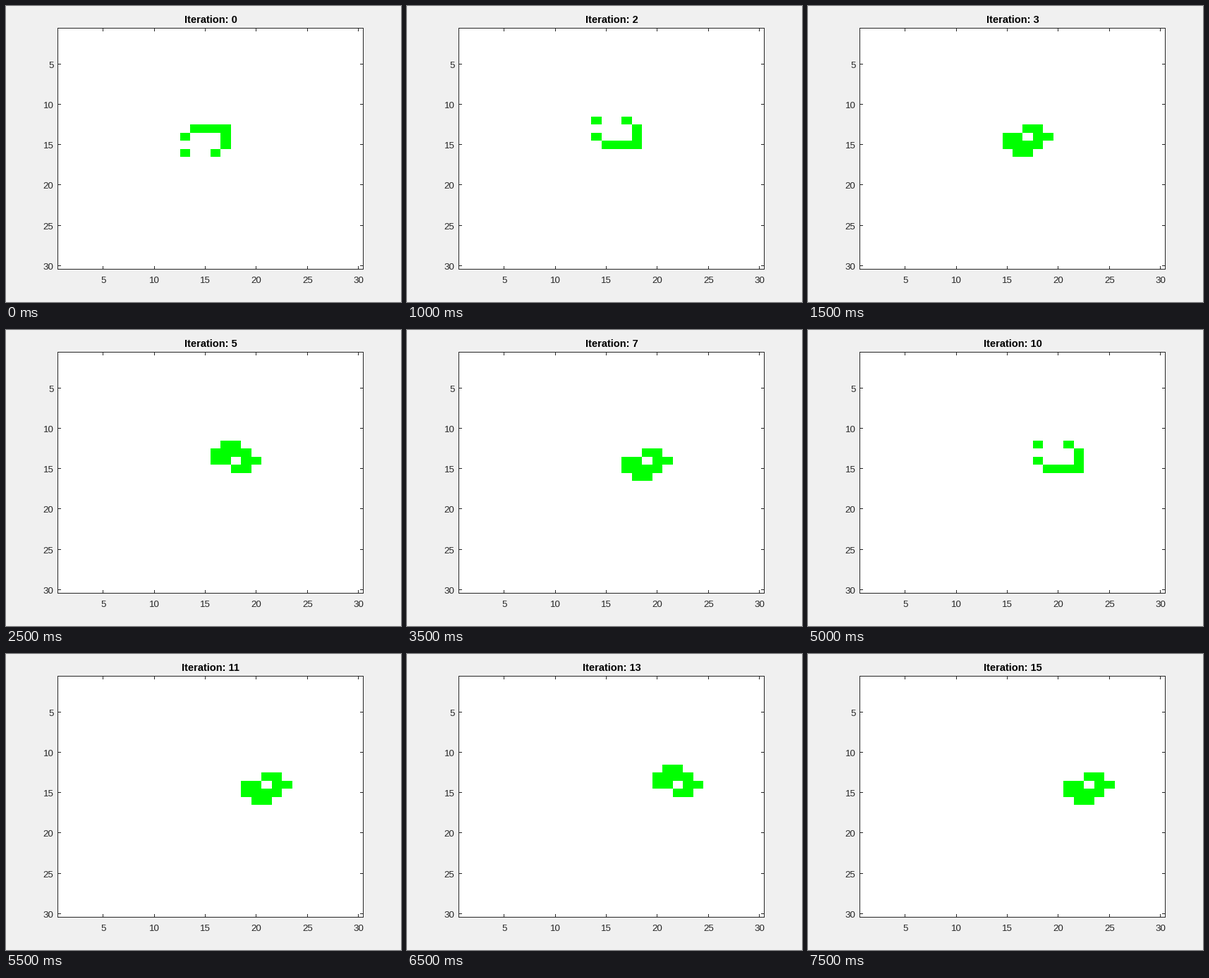
A matplotlib script that plays this animation: 560x420 px, repeating every 8000 ms.

```python
import numpy as np
import matplotlib.pyplot as plt
from matplotlib.animation import FuncAnimation
from matplotlib.colors import ListedColormap
from matplotlib.patches import Rectangle

W, H, DPI = 560, 420, 100
N, STEPS, STEP_MS = 30, 16, 500
LEFT, TOP, RIGHT, BOTTOM = 73, 31, 507, 374
INK = "#262626"
TICK = 4

plt.rcParams["font.family"] = "Liberation Sans"


def px(size):
    """Font size in points for a height in pixels."""
    return size * 72 / DPI


def life_step(grid):
    near = sum(np.roll(grid, (dy, dx), (0, 1))
               for dy in (-1, 0, 1) for dx in (-1, 0, 1)) - grid
    return ((near == 3) | ((grid == 1) & (near == 2))).astype(int)


def spaceship():
    grid = np.zeros((N, N), int)
    shape = [".####", "#...#", "....#", "#..#."]
    for y, row in enumerate(shape):
        for x, cell in enumerate(row):
            grid[12 + y, 12 + x] = cell == "#"
    return grid


grids = [spaceship()]
while len(grids) < STEPS:
    grids.append(life_step(grids[-1]))

fig = plt.figure(figsize=(W / DPI, H / DPI), dpi=DPI, facecolor="#f0f0f0")
ax = fig.add_axes([0, 0, 1, 1])

# Cell edges snapped to whole pixels
xs = np.floor(np.linspace(LEFT, RIGHT, N + 1) + 0.5)
ys = np.floor(np.linspace(TOP, BOTTOM, N + 1) + 0.5)
mesh = ax.pcolormesh(xs, ys, grids[0], vmin=0, vmax=1,
                     cmap=ListedColormap(["#ffffff", "#00ff00"]))
ax.set(xlim=(0, W), ylim=(H, 0))
ax.axis("off")


def bar(x, y, w, h):
    ax.add_patch(Rectangle((x, y), w, h, color=INK, lw=0,
                           antialiased=False, zorder=3))


for y in (TOP, BOTTOM - 1):
    bar(LEFT, y, RIGHT - LEFT, 1)
for x in (LEFT, RIGHT - 1):
    bar(x, TOP, 1, BOTTOM - TOP)

label = dict(fontsize=px(13.33), color=INK, va="baseline")
for n in range(5, N + 1, 5):
    x = 72.8 + (n - 0.5) * 434 / N
    y = 31.5 + (n - 0.5) * 342.3 / N
    for edge in (TOP, BOTTOM - 1 - TICK):
        bar(int(x), edge, 1, TICK + 1)
    for edge in (LEFT, RIGHT - 1 - TICK):
        bar(edge, int(y), TICK + 1, 1)
    ax.text(x + 0.3, 393, str(n), ha="center", **label)
    ax.text(67.5, int(y) + 6, str(n), ha="right", **label)

title = ax.text(290, 24, "", fontsize=px(14.67), weight="bold",
                color="black", ha="center", va="baseline")


def draw(i):
    mesh.set_array(grids[i])
    title.set_text(f"Iteration: {i}")
    return mesh, title


anim = FuncAnimation(fig, draw, frames=STEPS, interval=STEP_MS,
                     repeat=True, repeat_delay=0)
plt.show()
```
